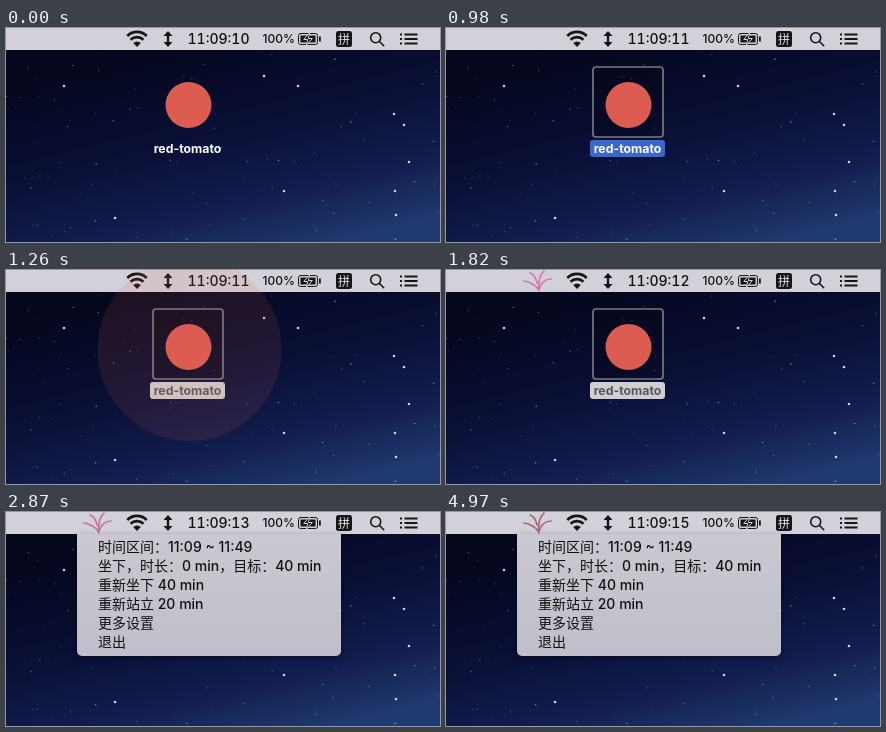
Write an HTML page that moves like this. It is 434 by 214 pixels and loops after 5880 ms.

```html
<!DOCTYPE html>
<html lang="zh">
<head>
<meta charset="utf-8">
<style>
  html, body { margin: 0; width: 434px; height: 214px; overflow: hidden; background: #0b1233; }
  svg { display: block; }
  text { font-family: Inter, "Noto Sans CJK SC", "Noto Sans CJK", sans-serif; font-weight: 500; fill: #111; }
  .line { fill: none; stroke: #161616; stroke-linecap: round; }
  #clock { font-size: 14px; font-variant-numeric: tabular-nums; }
  #label { font-size: 12.3px; font-weight: 700; text-anchor: middle; }
  #menu { filter: drop-shadow(0 2px 3px rgba(0, 0, 0, .35)); }
  #menu text { font-size: 14px; }
</style>
</head>
<body>
<svg width="434" height="214" viewBox="0 0 434 214">
  <defs>
    <linearGradient id="sky" gradientUnits="userSpaceOnUse" x1="185" y1="10" x2="240" y2="235">
      <stop offset="0" stop-color="#05071d"/>
      <stop offset=".45" stop-color="#0a1037"/>
      <stop offset=".75" stop-color="#121e4e"/>
      <stop offset="1" stop-color="#20396f"/>
    </linearGradient>
    <linearGradient id="panel" x2="0" y2="1">
      <stop offset="0" stop-color="#cac9d1"/>
      <stop offset="1" stop-color="#bebfca"/>
    </linearGradient>
  </defs>

  <rect width="434" height="214" fill="url(#sky)"/>
  <g id="stars" fill="#dfe6ff"></g>

  <rect id="frame" x="147" y="39" width="70" height="70" rx="3" fill="#000" fill-opacity=".2" stroke="#77787f" stroke-width="1.7"/>
  <circle cx="182.5" cy="77" r="23" fill="#dc5c52"/>
  <rect id="pill" x="144" y="112" width="75" height="17" rx="3"/>
  <text id="label" x="181.5" y="125">red-tomato</text>

  <rect width="434" height="22" fill="#d2d1da"/>
  <path id="plant" fill="none" stroke-width="1.7" stroke-linecap="round"
    d="M93 21C92 14 93 6 98 1M92 19C89 15 84 12 78 11M93 19C95 13 99 9 105 9M91 13C90 8 87 4 84 3"/>
  <g class="line" stroke-width="2.7" style="stroke-linecap:butt">
    <path d="M121.3 8a13.700 13.700 0 0 1 19.400 0M124.600 11.700a9 9 0 0 1 12.800 0"/>
    <path d="M131 19L127.200 15a5.300 5.300 0 0 1 7.600 0z" fill="#161616" stroke="none"/>
  </g>
  <path d="M162 3l4.5 5h-3.3v6h3.3l-4.5 5l-4.5-5h3.3v-6h-3.3z" fill="#161616"/>
  <text id="clock" x="181.5" y="16"></text>
  <text x="256.5" y="15.2" font-size="12">100%</text>
  <rect class="line" x="292.5" y="5.5" width="19" height="11" rx="2"/>
  <path d="M294.5 7.5h15v7h-15zM313 8.5h1.8v5H313z" fill="#161616"/>
  <path d="M303.8 4.5l-6 7h4l-1.5 6l6-7h-4z" fill="#161616" stroke="#d2d1da"/>
  <rect x="330" y="3" width="16" height="16" rx="2.5" fill="#161616"/>
  <text x="338" y="15.5" font-size="12" text-anchor="middle" style="fill:#e4e3ea">拼</text>
  <path class="line" stroke-width="1.6" d="M373.5 13.5l4.2 4.2M374.7 9.7a5 5 0 1 1-10 0a5 5 0 1 1 10 0"/>
  <path class="line" stroke-width="1.9" style="stroke-linecap:butt"
    d="M394 6.5h2M398.5 6.5h13M394 11h2M398.5 11h13M394 15.5h2M398.5 15.5h13"/>

  <circle id="ghost" cx="183.5" cy="79" fill="#dc5c52"/>
  <g id="menu">
    <path d="M71 22H335V139a5 5 0 0 1-5 5H76a5 5 0 0 1-5-5z" fill="url(#panel)"/>
  </g>
</svg>
<script>
const $ = id => document.getElementById(id);
const STEP = 70, LOOP = 5880;

function add(parent, name, attrs) {
  const el = document.createElementNS("http://www.w3.org/2000/svg", name);
  for (const key in attrs) el.setAttribute(key, attrs[key]);
  return parent.appendChild(el);
}

const star = (cx, cy, r, opacity) => add($("stars"), "circle", { cx, cy, r, opacity });
[[58, 58], [292, 58], [258, 48], [388, 86], [398, 97], [403, 134],
 [389, 163], [109, 190], [278, 163], [390, 187]].forEach(([x, y]) => star(x, y, 1.3, .9));
let seed = 17;
const random = () => (seed = seed * 16807 % 2147483647) / 2147483647;
for (let i = 0; i < 85; i++) {
  star(random() * 434, 24 + random() * 188, .35 + random() * .4, .25 + random() * .45);
}

["时间区间：11:09 ~ 11:49", "坐下，时长：0 min，目标：40 min", "重新坐下 40 min",
 "重新站立 20 min", "更多设置", "退出"].forEach((line, i) => {
  add($("menu"), "text", { x: 92, y: 40 + i * 19 }).textContent = line;
});

const show = (id, on) => $(id).setAttribute("visibility", on ? "visible" : "hidden");

function draw(now) {
  const t = Math.floor(now % LOOP / STEP) * STEP;
  const selected = t >= 700, launched = t >= 1050;

  $("clock").textContent = "11:09:" + (10 + Math.floor((t + 280) / 1050));

  show("frame", selected);
  show("pill", selected);
  $("pill").setAttribute("fill", launched ? "#cfcfd1" : "#3c66cc");
  $("label").style.fill = launched ? "#58585c" : "#fff";

  // Launch zoom: the icon swells and fades away
  const p = (t - 1050) / 280;
  show("ghost", p >= 0 && p < 1);
  $("ghost").setAttribute("r", 23 * Math.max(1, 1 + 4 * p));
  $("ghost").setAttribute("opacity", Math.max(0, .47 * (1 - p)));

  show("plant", t >= 1540);
  $("plant").setAttribute("stroke",
    t < 2660 ? "#d774b2" : t < 2870 ? "#a87092" : t < 3150 ? "#c9709f" : "#a8657f");
  show("menu", t >= 2870);
}

const start = performance.now();
(function tick() {
  draw(performance.now() - start);
  requestAnimationFrame(tick);
})();
</script>
</body>
</html>
```
